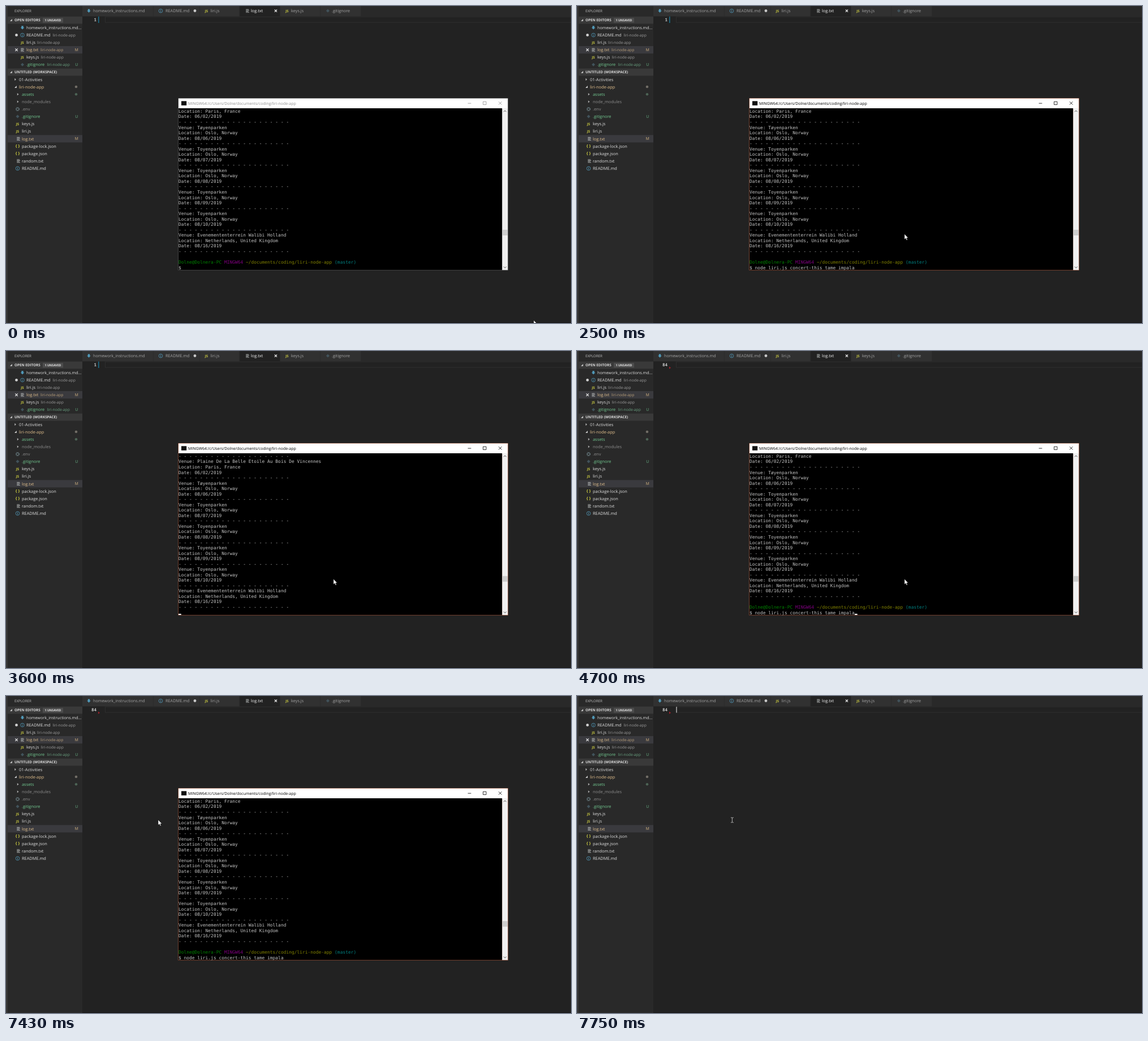
An HTML page for the animation above (8 s loop, 999 by 561 pixels).

```html
<!DOCTYPE html>
<html lang="en">
<head>
<meta charset="utf-8">
<title>Editor and terminal</title>
<style>
html, body { margin: 0; width: 100%; height: 100%; overflow: hidden; background: #222; }
svg { display: block; width: 999px; height: 561px; }
text { text-rendering: geometricPrecision; font-family: "Open Sans", "Noto Sans", sans-serif; }
.mono { font-family: "DejaVu Sans Mono", monospace; }
.num { font-family: "Noto Sans Mono", monospace; font-weight: 600; }
</style>
</head>
<body>
<svg id="stage" viewBox="0 0 999 561" xmlns="http://www.w3.org/2000/svg"></svg>
<script>
const NS = "http://www.w3.org/2000/svg";
const LOOP = 8000, ROW = 9.54, CELL = 4.768, LEFT = 305, TOP = 181.5;
const stage = document.getElementById("stage");

function el(tag, attrs, parent = stage) {
  const node = document.createElementNS(NS, tag);
  for (const key in attrs) node.setAttribute(key, attrs[key]);
  parent.appendChild(node);
  return node;
}
const rect = (x, y, width, height, fill, parent) => el("rect", { x, y, width, height, fill }, parent);
const line = (d, stroke, w = 0.7, parent) => el("path", { d, stroke, "stroke-width": w, fill: "none" }, parent);
const shape = (d, fill, parent) => el("path", { d, fill }, parent);
const dot = (cx, cy, r, fill) => el("circle", { cx, cy, r, fill });

// y is the middle of the capitals
function label(x, y, str, fill = "#d6d6d6", size = 7.35, extra = {}, parent) {
  const node = el("text", { x, y: y + size * 0.357, fill, "font-size": size, ...extra }, parent);
  node.textContent = str;
  return node;
}

const BLUE = "#519aba", YELLOW = "#cbcb41", GOLD = "#e2c08d", GREEN = "#73c991", DIM = "#8c8c8c";
const bold = { "font-weight": 700 };
const mid = { "text-anchor": "middle" };

const icons = {
  md: (x, y) => shape(`M${x - 1.7} ${y - 3}h3.4v2.6h1.6l-3.3 3.6l-3.3 -3.6h1.6z`, BLUE),
  info: (x, y) => {
    el("circle", { cx: x, cy: y, r: 3.3, fill: "none", stroke: BLUE, "stroke-width": 0.8 });
    line(`M${x} ${y - 2}v1M${x} ${y - 0.4}v2.3`, BLUE, 0.9);
  },
  js: (x, y) => label(x, y, "JS", YELLOW, 6, { ...mid, ...bold }),
  txt: (x, y) => line(`M${x - 2.8} ${y - 2.5}h5M${x - 2.8} ${y - 0.8}h5.8M${x - 2.8} ${y + 0.9}h4.4M${x - 2.8} ${y + 2.6}h5.8`, "#c5c8c7", 0.8),
  git: (x, y) => shape(`M${x} ${y - 3}l3 3l-3 3l-3 -3z`, "#41535b"),
  json: (x, y) => label(x, y - 0.4, "{ }", YELLOW, 7, { ...mid, ...bold }),
  env: (x, y) => {
    el("circle", { cx: x, cy: y, r: 2.9, fill: "none", stroke: "#6d8086", "stroke-width": 1.1, "stroke-dasharray": "1.5 0.78" });
    el("circle", { cx: x, cy: y, r: 2, fill: "none", stroke: "#6d8086", "stroke-width": 0.8 });
  }
};
const cross = (x, y, r, color, w = 1, parent) =>
  line(`M${x - r} ${y - r}l${2 * r} ${2 * r}M${x + r} ${y - r}l${-2 * r} ${2 * r}`, color, w, parent);
const opened = (x, y) => shape(`M${x + 1.8} ${y - 2}v3.8h-3.8z`, "#cfcfcf");
const closed = (x, y) => shape(`M${x - 1.2} ${y - 2.2}l2.6 2.2l-2.6 2.2z`, "#b5b5b5");

function drawSidebar() {
  rect(0, 0, 3, 561, "#363636");
  rect(3, 0, 132, 561, "#292929");
  label(15, 8.5, "EXPLORER", "#c4c4c4", 6.2);
  for (const [y, title] of [[25, "OPEN EDITORS"], [117, "UNTITLED (WORKSPACE)"]]) {
    rect(3, y - 6.3, 132, 12.7, "#393939");
    opened(9, y);
    label(15, y, title, "#dadada", 6.3, bold);
  }
  el("rect", { x: 65, y: 21, width: 36, height: 8.4, fill: "#4d4d4d", rx: 0.5 });
  label(83, 25.2, "1 UNSAVED", "#e6e6e6", 5.2, { ...mid, ...bold });

  const selected = y => rect(3, y - 6.6, 132, 13.1, "#3a3a3e");
  const white = "#dedede";
  const editors = [
    ["md", "homework_instructions.md...", white],
    ["info", "README.md", white, 82.5],
    ["js", "liri.js", white, 55],
    ["txt", "log.txt", GOLD, 61, "M"],
    ["js", "keys.js", white, 61.5],
    ["git", ".gitignore", GREEN, 72.5, "U"]
  ];
  editors.forEach(([icon, name, color, descX, mark], i) => {
    const y = 38.3 + 13.1 * i;
    if (mark === "M") selected(y);
    icons[icon](29, y);
    label(36, y, name, color, i ? 7.35 : 7.2);
    if (descX) label(descX, y + 0.2, "liri-node-app", mark === "M" ? "#b89f78" : mark ? "#69a180" : "#9b9b9b", 6.75);
    if (mark) label(124.7, y, mark, mark === "M" ? "#c9ab7d" : "#69b184", 7, mid);
  });
  dot(18.5, 51.4, 2.4, "#d2d2d2");
  cross(18.5, 77.6, 2.2, "#f0f0f0", 1.2);

  const tree = [
    [closed, 16.5, 23, "01-Activities", white],
    [opened, 17, 23, "liri-node-app", GOLD],
    [closed, 21, 28, "assets", GREEN],
    [closed, 21, 28, "node_modules", DIM],
    ["env", 20.5, 28, ".env", DIM],
    ["git", 20.5, 28, ".gitignore", GREEN, "U"],
    ["js", 20.5, 28, "keys.js", white],
    ["js", 20.5, 28, "liri.js", white],
    ["txt", 22, 28, "log.txt", GOLD, "M"],
    ["json", 20.5, 28, "package-lock.json", white],
    ["json", 20.5, 28, "package.json", white],
    ["txt", 22, 28, "random.txt", white],
    ["info", 20.5, 28, "README.md", white]
  ];
  tree.forEach(([icon, iconX, x, name, color, mark], i) => {
    const y = 130 + 13.12 * i;
    if (mark === "M") selected(y);
    (icons[icon] || icon)(iconX, y);
    label(x, y, name, color, 7.4);
    if (mark) label(124.7, y, mark, mark === "M" ? "#c9ab7d" : "#69b184", 7, mid);
  });
  dot(124, 143, 2.3, "#716d66");
  dot(124, 156.2, 2.3, "#4d6355");
}

function drawTabs() {
  rect(135, 0, 864, 18.3, "#292929");
  const tabs = [
    [135, 126, "md", 146.5, 154, "homework_instructions.md", 7.2],
    [261, 82, "info", 273.5, 282, "README.md"],
    [343, 70, "js", 354.5, 361.5, "liri.js"],
    [413.5, 71, "txt", 427, 433, "log.txt"],
    [485, 71, "js", 497, 504, "keys.js"],
    [556, 72, "git", 569, 576, ".gitignore"]
  ];
  for (const [x, w, icon, iconX, textX, name, size] of tabs) {
    const active = name === "log.txt";
    rect(x, 0, w - 0.6, 18.3, active ? "#222222" : "#313131");
    icons[icon](iconX, 8.6);
    label(textX, 8.6, name, active ? "#f4f4f4" : "#a3a3a3", size);
  }
  dot(334, 8.5, 2.4, "#c8c8c8");
  cross(477, 8.6, 2.1, "#f0f0f0", 1.2);
}

rect(0, 0, 999, 561, "#222222");
drawTabs();
line("M175.5 19.2H999M175.5 29.2H999M175.5 19V29.5", "#303030", 0.9);
rect(135, 560.3, 864, 0.7, "#121212");
drawSidebar();

const lineNo = label(160, 24.3, "1", "#c6c6c6", 7.6, { class: "num", "text-anchor": "end" });
const changed = rect(163, 18.6, 1.6, 11.4, "#1b6f8c");
const removed = shape("M163 27.6l3 2.1l-3 2.1z", "#a3202c");
const caret = rect(175.4, 19, 1.2, 10.6, "#d0d0d0");

// terminal window
const win = el("g", {});
const frame = rect(304.4, 163, 583.4, 304.8, "#555", win);
rect(305, 163.6, 582.2, 18, "#fff", win);
rect(LEFT, 181, 572.3, 286.2, "#000", win);
rect(877.3, 181, 9.9, 286.2, "#f0f0f0", win);
const thumb = rect(877.8, 396, 9, 10, "#cdcdcd", win);
line("M880 187.3l2.3 -2.3l2.3 2.3M880 461.3l2.3 2.3l2.3 -2.3", "#505050", 1, win);
rect(310, 168.3, 9.2, 7.6, "#111", win);
const title = label(322, 172.3, "MINGW64:/c/Users/Dolne/documents/coding/liri-node-app", "#000", 6.96, {}, win);
const buttons = line("M816.6 172.2h5.8M843.6 169.2h5.4v5.4h-5.4zM871 169.2l5.5 5.5M876.5 169.2l-5.5 5.5", "#000", 0.8, win);

const clip = el("clipPath", { id: "screen" }, el("defs", {}));
rect(LEFT, 181, 572, 286.4, "#000", clip);
const screen = el("g", { "clip-path": "url(#screen)" }, win);
const scroll = el("g", {}, screen);

const DASH = Array(21).fill("-").join(" ");
const shows = [["Plaine De La Belle Etoile Au Bois De Vincennes", "Paris, France", "06/02"], ["Tøyenparken", "Oslo, Norway", "08/06"]];
for (const day of ["07", "08", "09", "10"]) shows.push(["Toyenparken", "Oslo, Norway", "08/" + day]);
shows.push(["Evenemententerrein Walibi Holland", "Netherlands, United Kingdom", "08/16"]);
const rows = [DASH];
for (const [venue, place, date] of shows)
  rows.push("Venue: " + venue, "Location: " + place, `Date: ${date}/2019`, DASH);
rows.push("", "", "$", "this is loaded");

const rowNodes = rows.map((str, i) => {
  const node = el("text", { x: LEFT, y: TOP + ROW * i + 7.4, fill: "#c4c4c4", "font-size": 7.92, class: "mono" }, scroll);
  node.textContent = str;
  return node;
});
const PROMPT = 30, INPUT = 31, REPLY = 32;
[["Dolne@Dolnera-PC ", "#008000"], ["MINGW64 ", "#800080"], ["~/documents/coding/liri-node-app ", "#808000"], ["(master)", "#008080"]]
  .forEach(([str, fill]) => { el("tspan", { fill }, rowNodes[PROMPT]).textContent = str; });
const COMMAND = "$ node liri.js concert-this tame impala";
const block = rect(LEFT, 465, CELL, 2.2, "#f2f2f2", screen);

const arrow = el("path", { d: "M0 0V9.6L2.2 7.6L3.8 11L5.3 10.3L3.8 7.1H6.7Z", fill: "#fff", stroke: "#000", "stroke-width": 0.5 });
const beam = line("M272 215.2h1.8l.6 .5l.6 -.5h1.8M274.4 215.7v7.6M272 223.8h1.8l.6 -.5l.6 .5h1.8", "#d8d8d8", 0.8);

// last value whose start time has passed
const pick = (t, steps) => steps.reduce((v, [start, value]) => (t >= start ? value : v), steps[0][1]);
const show = (node, on) => node.setAttribute("visibility", on ? "visible" : "hidden");

const scrollSteps = [[0, 2], [2740, 3], [2840, 4], [3600, 0], [3720, 2]];
const pointer = [
  [0, [933, 556]], [100, [820, 506]], [210, [650, 432]], [310, [579, 403.5]],
  [6540, [520, 365]], [6650, [390, 278]], [6760, [319, 230]],
  [7080, [306, 224]], [7200, [282, 217]], [7320, [270, 219]], [7430, [269, 219]]
];
const cursorFlips = [990, 1550, 2080, 2500, 2740, 3930, 4030, 4190, 4700, 5230, 5680, 6240, 6760, 7320];
const between = (t, a, b) => t >= a && t < b;

function draw(t) {
  const active = t >= 460;
  const open = t < 7650;
  const typed = between(t, 1210, 3600) || t >= 4030;
  const running = between(t, 2740, 3720);

  win.setAttribute("display", open ? "inline" : "none");
  frame.setAttribute("fill", active ? "#a5583c" : "#5a5a5a");
  title.setAttribute("fill", active ? "#000" : "#8e8e8e");
  buttons.setAttribute("stroke", active ? "#000" : "#8e8e8e");
  thumb.setAttribute("y", t < 3600 ? 396 : 398.3);

  scroll.setAttribute("transform", `translate(0 ${-ROW * pick(t, scrollSteps)})`);
  rowNodes[INPUT].textContent = typed ? COMMAND : "$";
  show(rowNodes[REPLY], between(t, 2840, 3600));

  const col = running ? 0 : typed ? COMMAND.length : 2;
  block.setAttribute("x", LEFT + col * CELL);
  show(block, cursorFlips.filter(f => t >= f).length % 2 === 1);

  lineNo.textContent = t < 3720 ? "1" : "84";
  show(changed, t < 3930);
  show(removed, t >= 3930);
  show(caret, t >= 7750);

  arrow.setAttribute("transform", `translate(${pick(t, pointer)})`);
  show(arrow, open);
  show(beam, !open);
}

const began = performance.now();
function tick() {
  draw((performance.now() - began) % LOOP);
  requestAnimationFrame(tick);
}
tick();
</script>
</body>
</html>
```
